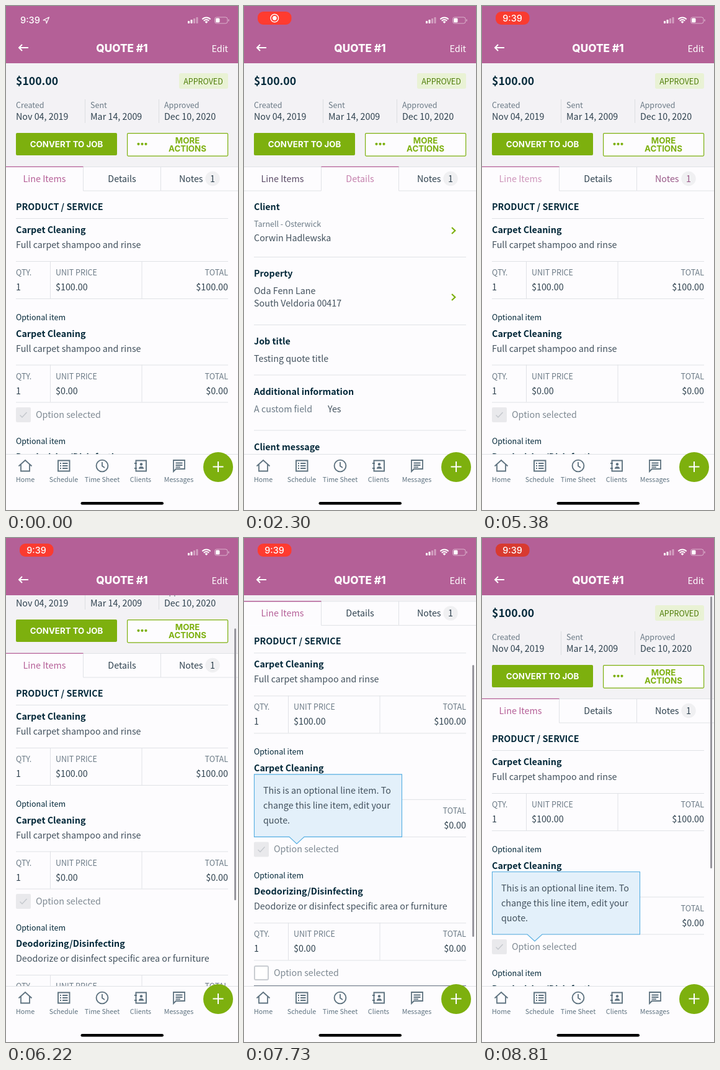
Write an HTML page that moves like this. It is 374x810 px and loops after 8840 ms.

```html
<!DOCTYPE html>
<html lang="en">
<head>
<meta charset="utf-8">
<title>Quote screen</title>
<style>
  html, body { margin: 0; width: 100%; height: 100%; overflow: hidden; background: #fdfcfe; }
  svg { display: block; width: 100%; height: 100%; }
  text { font-family: "Noto Sans CJK SC", "Noto Sans CJK JP", "Noto Sans CJK KR", "Noto Sans CJK TC", "Open Sans", sans-serif; white-space: pre; }
  .ui { font-family: Inter, Roboto, sans-serif; }
</style>
</head>
<body>
<svg id="stage" viewBox="0 0 374 810" xmlns="http://www.w3.org/2000/svg"></svg>
<script>
const LOOP = 8840;
const C = {
  bar: '#b46097', pink: '#b55f97', ink: '#04293a', body: '#43525e', tab: '#2f424f', soft: '#6b7a86',
  mute: '#7f8a93', rule: '#e0e2e6', green: '#7db00e', icon: '#5f7380', page: '#fdfcfe'
};
const CJK = 1 / 1.117; // these Latin glyphs run large for their nominal size

// ---- drawing helpers ----
function text(x, y, str, { s = 16, w = 400, c = C.body, a = 'start', id = '' } = {}) {
  return `<text ${id && `id="${id}"`} x="${x}" y="${y}" font-size="${(s * CJK).toFixed(2)}" font-weight="${w}" fill="${c}" text-anchor="${a}">${str}</text>`;
}
const ui = (x, y, str, s, w, c, a = 'middle') =>
  `<text class="ui" x="${x}" y="${y}" font-size="${s}" font-weight="${w}" fill="${c}" text-anchor="${a}">${str}</text>`;
const rect = (x, y, w, h, fill, more = '') => `<rect x="${x}" y="${y}" width="${w}" height="${h}" fill="${fill}" ${more}/>`;
const path = (d, stroke, w, more = '') => `<path d="${d}" fill="none" stroke="${stroke}" stroke-width="${w}" ${more}/>`;
const circle = (x, y, r, fill, more = '') => `<circle cx="${x}" cy="${y}" r="${r}" fill="${fill}" ${more}/>`;
const rule = y => path(`M16 ${y}H358`, C.rule, 1);
const bold = (y, str) => text(16, y, str, { w: 700, c: C.ink });
const group = (id, inner) => `<g id="${id}">${inner}</g>`;

// ---- quote summary ----
function fact(x, label, date) {
  return text(x, 164, label, { s: 14, c: C.soft }) + text(x, 183, date, { c: C.tab });
}
const summary =
  rect(0, 92, 374, 166, '#f3f2f5') +
  text(16, 127, '$100.00', { s: 19.7, w: 700, c: C.ink }) +
  rect(279, 108, 79, 25, '#e9f2d5', 'rx="3"') +
  text(318, 126, 'APPROVED', { s: 14, c: '#4f7d08', a: 'middle' }) +
  fact(16, 'Created', 'Nov 04, 2019') + fact(136, 'Sent', 'Mar 14, 2009') + fact(255, 'Approved', 'Dec 10, 2020') +
  path('M127.5 150V188M246.5 150V188', '#dcdee2', 1) +
  rect(16, 204, 163, 36, C.green, 'rx="2"') +
  ui(97.5, 226.5, 'CONVERT TO JOB', 13.3, 700, '#fff') +
  rect(195.6, 204.6, 162, 36.5, C.page, `rx="1.5" stroke="${C.green}" stroke-width="1.2"`) +
  [213.5, 219.5, 225.5].map(x => circle(x, 221.8, 2.1, C.green)).join('') +
  ui(292.5, 220.5, 'MORE', 13.3, 700, C.green) + ui(292.5, 234, 'ACTIONS', 13.3, 700, C.green);

// ---- tabs ----
const tabEdges = [0, 124.5, 249.5, 374];
const tabs = rect(0, 258, 374, 39, C.page) + path('M0 258.5H374M124.5 258V297M249.5 258V297', C.rule, 1) +
  [0, 1, 2].map(i =>
    path(`M${tabEdges[i]} 297H${tabEdges[i + 1]}`, C.rule, 1, `id="base${i}"`) +
    path(`M${tabEdges[i]} 258.4H${tabEdges[i + 1]}`, C.pink, 1.4, `id="top${i}"`)).join('') +
  text(62, 283, 'Line Items', { a: 'middle', id: 'label0' }) +
  text(187, 283, 'Details', { a: 'middle', id: 'label1' }) +
  circle(333, 277.5, 11.7, '#f0f0f2') +
  group('label2', text(279, 283, 'Notes', { c: 'inherit' }).replace('fill="inherit"', '') +
    text(333, 283, '1', { a: 'middle', c: 'inherit' }).replace('fill="inherit"', ''));

// ---- panes ----
function item(dy, name, about, price) {
  const head = (x, str, a) => text(x, 433, str, { s: 14, c: C.soft, a });
  const cell = (x, str, a) => text(x, 457, str, { c: C.tab, a });
  return `<g transform="translate(0 ${dy})">` +
    bold(365, name) + text(16, 389, about) + rule(410.5) + rule(470.5) +
    path('M71.5 410V470M219 410V470', C.rule, 1) +
    head(16, 'QTY.') + head(80, 'UNIT PRICE') + head(358, 'TOTAL', 'end') +
    cell(16, '1') + cell(80, price) + cell(358, price, 'end') + '</g>';
}
function option(dy, on) {
  const box = on
    ? rect(16, 645, 24, 24, '#e9e9ec', 'rx="2"') + path('M22.5 657.5L26 661L33.5 653', '#c3c7cc', 1.4)
    : rect(17, 646, 22, 22, '#fff', 'rx="2" stroke="#c9cdd2" stroke-width="2"');
  return `<g transform="translate(0 ${dy})">` + text(16, 505, 'Optional item', { s: 14, c: C.ink }) +
    box + text(48, 662, 'Option selected', { c: C.mute }) + '</g>';
}
const tip = group('tip',
  `<path d="M16.5 536.5H254.5V637H97L85 648L73 637H16.5Z" fill="#e3f0fa" stroke="#55aee2" stroke-width="1.1"/>` +
  ['This is an optional line item. To', 'change this line item, edit your', 'quote.']
    .map((str, i) => text(31, 568 + 24 * i, str)).join(''));

const lines =
  bold(328, 'PRODUCT / SERVICE') + rule(341.5) +
  item(0, 'Carpet Cleaning', 'Full carpet shampoo and rinse', '$100.00') +
  item(166.5, 'Carpet Cleaning', 'Full carpet shampoo and rinse', '$0.00') + option(0, true) +
  item(365, 'Deodorizing/Disinfecting', 'Deodorize or disinfect specific area or furniture', '$0.00') + option(198.5, false) +
  rect(16, 875.7, 342, 4, '#6a7685') +
  text(16, 903, 'Subtotal') + text(358, 903, '$100.00', { a: 'end', c: C.tab }) + rule(916) +
  bold(939.5, 'Total') + text(358, 939.5, '$100.00', { w: 700, c: C.ink, a: 'end' }) +
  rect(16, 952.5, 342, 4, '#e4e4e8') + tip;

const chevron = y => path(`M335 ${y - 5}L340.3 ${y}L335 ${y + 5}`, C.green, 2.2);
const details =
  bold(328, 'Client') + text(16, 355, 'Tarnell - Osterwick', { s: 14, c: C.soft }) +
  text(16, 378, 'Corwin Hadlewska') + chevron(361) + rule(403.5) +
  bold(435, 'Property') + text(16, 463, 'Oda Fenn Lane') + text(16, 483, 'South Veldoria 00417') + chevron(468) + rule(512.5) +
  bold(544, 'Job title') + text(16, 572, 'Testing quote title') + rule(593) +
  bold(625, 'Additional information') + text(16, 652.5, 'A custom field', { c: C.soft }) + text(135, 652.5, 'Yes') + rule(682) +
  bold(713.5, 'Client message');

const notes = group('spinner',
  circle(187, 345, 21, '#dcdfe2') + circle(187, 345, 19.8, '#fff') + circle(187, 345, 12, '#cfd4d8') +
  `<g id="spin"><path d="M197.5 334A15.2 15.2 0 1 0 196.4 357" fill="none" stroke="#6b7986" stroke-width="7"/></g>`);

// ---- fixed chrome ----
const arc = r => path(`M${323 - r * 0.72} ${28 - r * 0.72}A${r} ${r} 0 0 1 ${323 + r * 0.72} ${28 - r * 0.72}`, '#fff', 2);
const status =
  [0, 1, 2, 3].map(i => rect(293 + 4.5 * i, 24 - 2 * i, 3, 4 + 2 * i, '#fff', `rx=".8" opacity="${i < 2 ? 1 : 0.4}"`)).join('') +
  arc(9.2) + arc(5.8) + `<path d="M323 28L320.6 25.4A3.4 3.4 0 0 1 325.4 25.4Z" fill="#fff"/>` +
  rect(336.5, 18, 20.5, 10, 'none', 'rx="3" stroke="#fff" stroke-opacity=".5"') +
  rect(338, 19.5, 6.5, 7, '#fff', 'rx="1.5"') + rect(358.3, 21.2, 1.4, 3.6, '#fff', 'rx=".7" opacity=".5"') +
  group('clock', ui(23, 28, '9:39', 14.6, 500, '#fff', 'start') +
    path('M69.5 18L60 22.8L64.6 23.2L65.2 28Z', '#fff', 1.1, 'stroke-linejoin="round"')) +
  group('pill', rect(22, 9, 54.5, 21, '#ff3b30', 'rx="9" id="pillBack"') +
    group('pillTime', ui(49, 24.7, '9:39', 14.4, 500, '#fff')) +
    group('pillDot', circle(49.3, 19.5, 6.3, 'none', 'stroke="#fff" stroke-width="1.4"') + circle(49.3, 19.5, 3.4, '#fff')));

const header = rect(0, 0, 374, 92, C.bar) + status +
  path('M36 67H21M26 62L21 67L26 72', '#fff', 2) +
  ui(187, 73.5, 'QUOTE #1', 17.2, 800, '#fff') +
  text(358, 73.5, 'Edit', { c: '#fff', a: 'end' }) +
  rect(0, 88, 0, 4, 'url(#glow)', 'id="load"');

const icons =
  path('M20.5 739.5L31 730L41.5 739.5M24 737V747.5H38V737', C.icon, 1.8) +
  path('M84 730.5H102.5V747.5H84ZM91 735H99.5M91 739H99.5M91 743H99.5', C.icon, 1.9) +
  path('M87 735H89M87 739H89M87 743H89', C.icon, 2) +
  circle(155, 739, 9.4, 'none', `stroke="${C.icon}" stroke-width="1.9"`) + path('M155 733V739.3L159 742', C.icon, 1.8) +
  path('M209.5 730.5H226V747.5H209.5ZM207 735H211M207 743H211', C.icon, 1.9) +
  circle(218, 736.5, 2.2, C.icon) + `<path d="M213.8 743.8Q214 740 218 740T222.2 743.8Z" fill="${C.icon}"/>` +
  path('M270 730H288V744H274L270 748ZM273.5 734.5H284.5M273.5 738H284.5M273.5 741.2H281', C.icon, 1.8);

const nav = rect(0, 720, 374, 90, C.page) + path('M0 720.5H374', C.rule, 1) + icons +
  [['Home', 31], ['Schedule', 93], ['Time Sheet', 155], ['Clients', 217], ['Messages', 278.5]]
    .map(([str, x]) => text(x, 765, str, { s: 12, c: C.icon, a: 'middle' })).join('') +
  circle(342, 741, 24, C.green) + path('M333.5 740.5H350.5M342 732V749', '#fff', 2) +
  rect(120.5, 797, 133.5, 4.6, '#000', 'rx="2.3"');

const stage = document.getElementById('stage');
stage.innerHTML =
  '<defs><linearGradient id="glow"><stop offset="0" stop-color="#dcb0cc"/><stop offset="1" stop-color="#f0dbe8"/></linearGradient></defs>' +
  rect(0, 0, 374, 810, C.page) +
  group('scroll', summary + tabs + group('pane0', lines) + group('pane1', details) + group('pane2', notes)) +
  rect(368, 94, 3, 437, '#96959c', 'rx="1.5" id="thumb"') + header + nav;

// ---- motion ----
const el = {};
stage.querySelectorAll('[id]').forEach(node => el[node.id] = node);
const set = (id, name, value) => el[id].setAttribute(name, value);
const show = (id, on) => set(id, 'visibility', on ? 'visible' : 'hidden');
const clamp = v => Math.max(0, Math.min(1, v));

// Smooth curve through [time, value] steps, without overshoot.
function curve(steps, t) {
  const last = steps.length - 1;
  if (t <= steps[0][0]) return steps[0][1];
  if (t >= steps[last][0]) return steps[last][1];
  const i = steps.findIndex(p => p[0] > t) - 1;
  const slope = k => (steps[k + 1][1] - steps[k][1]) / (steps[k + 1][0] - steps[k][0]);
  const tangent = k => {
    if (k === 0 || k === last) return 0;
    const a = slope(k - 1), b = slope(k);
    return a * b <= 0 ? 0 : 2 * a * b / (a + b);
  };
  const [t0, v0] = steps[i], [t1, v1] = steps[i + 1];
  const d = t1 - t0, u = (t - t0) / d, w = 1 - u;
  return v0 * (1 + 2 * u) * w * w + tangent(i) * d * u * w * w +
    v1 * u * u * (3 - 2 * u) - tangent(i + 1) * d * u * u * w;
}

function mix(a, b, k) {
  const part = (hex, i) => parseInt(hex.slice(i, i + 2), 16);
  return `rgb(${[1, 3, 5].map(i => Math.round(part(a, i) + (part(b, i) - part(a, i)) * k))})`;
}

const MAX = 266;
const scrollSteps = [[6040, 0], [6220, 72.5], [6400, 180], [6600, 252], [6810, 273.5], [7180, MAX],
  [7500, MAX], [7780, 130], [8060, 4], [8160, -16.5], [8230, -19], [8640, 0]];
const loadSteps = [[3930, 0], [4110, 126], [4500, 300], [4760, 374]];
const taps = [[0, 0], [2200, 1], [3880, 2], [5350, 0]];

function drawTabs(t) {
  const n = taps.filter(p => p[0] <= t).length - 1;
  const [since, now] = taps[n];
  const before = n ? taps[n - 1][1] : -1;
  const age = n ? t - since : 1e4;
  for (let i = 0; i < 3; i++) {
    const on = i === now;
    show('pane' + i, on);
    show('top' + i, on);
    show('base' + i, !on);
    const k = on ? 0 : i === before ? clamp(age / 150) : 1;
    set('label' + i, 'fill', mix(C.pink, C.tab, k));
    set('label' + i, 'opacity', on ? 0.6 + 0.4 * clamp(age / 220) : 1);
  }
  set('tip', 'display', t >= 7300 ? 'inline' : 'none');
  set('spinner', 'display', t < 4800 ? 'inline' : 'none');
  set('spin', 'transform', `rotate(${(t - 4110) * 0.36} 187 345)`);
}

function drawScroll(t) {
  const y = curve(scrollSteps, t);
  const inside = Math.max(0, Math.min(MAX, y));
  const over = Math.abs(y - inside);
  set('scroll', 'transform', `translate(0 ${-y})`);
  set('thumb', 'y', 94 + 187 * inside / MAX + (y > MAX ? over : 0));
  set('thumb', 'height', 437 - over);
  set('thumb', 'opacity', clamp((t - 6040) / 100));
}

function drawStatus(t) {
  const grow = clamp((t - 300) / 200);
  const dim = ((1 + Math.cos((t - 6810) * Math.PI / 1000)) / 2) ** 2;
  set('clock', 'opacity', 1 - grow);
  set('pill', 'opacity', grow);
  set('pillBack', 'fill', mix('#ff3b30', '#d83a30', t < 3000 ? 0 : dim));
  show('pillDot', t < 3000);
  show('pillTime', t >= 3000);
  set('load', 'width', curve(loadSteps, t));
  set('load', 'opacity', 1 - clamp((t - 4700) / 150));
}

const start = performance.now();
function frame() {
  const t = (performance.now() - start) % LOOP;
  drawTabs(t);
  drawScroll(t);
  drawStatus(t);
  requestAnimationFrame(frame);
}
frame();
</script>
</body>
</html>
```
